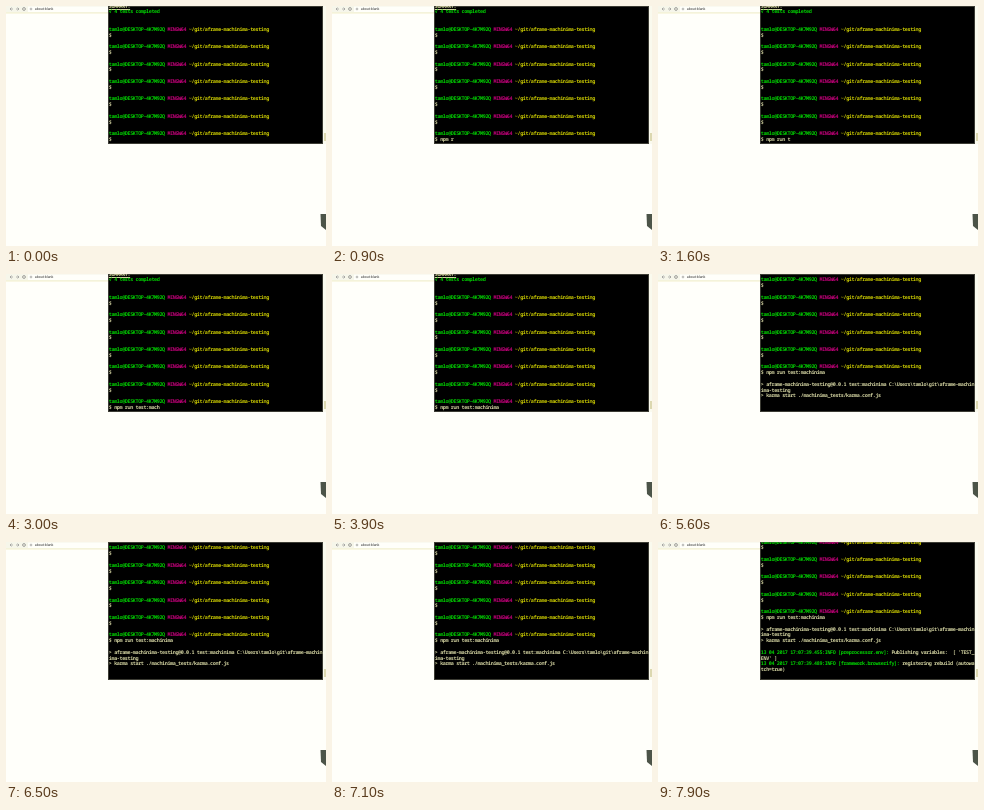
Animation, 320 px wide and 240 px high, one loop 8 s. Source, as an HTML page:

```html
<!DOCTYPE html>
<html lang="en">
<head>
<meta charset="utf-8">
<title>Terminal session</title>
<style>
  html, body { margin: 0; width: 100%; height: 100%; overflow: hidden; background: #fffffa; }
  body { position: relative; text-rendering: geometricPrecision; }
  #stage { position: absolute; inset: 0; width: 320px; height: 240px; }
  #url { font: 3.6px Roboto, sans-serif; fill: #333; }
  #terminal { position: absolute; left: 102px; top: 0; width: 215px; height: 138px; overflow: hidden; background: #000; box-shadow: inset 0 0 0 1px #3c3c34; }
  #rows { position: absolute; left: .8px; bottom: .3px; font: 600 5.1px "Noto Sans Mono", monospace; letter-spacing: calc(2.67px - .6em); color: #d2d2a0; }
  #rows div { height: 5.8px; line-height: 5.8px; white-space: pre; }
  #rows .green { color: #00d000; }
  #rows .magenta { color: #c00078; }
  #rows .yellow { color: #cccc00; }
  #rows .title { text-decoration: underline; }
</style>
</head>
<body>
<svg id="stage" viewBox="0 0 320 240">
  <path d="M0 0H102V7H0Z" fill="#f6f6ea"/>
  <path d="M22 .5H102V6H22Z" fill="#fffffa"/>
  <path d="M0 7H102" stroke="#f0ecc0" stroke-width=".8"/>
  <path d="M5.5 1.5 4 3l1.5 1.5M4 3h3M10 3h3M11.5 1.5 13 3l-1.5 1.5" fill="none" stroke="#888" stroke-width=".6"/>
  <circle cx="18" cy="3" r="1.4" fill="none" stroke="#666" stroke-width=".6"/>
  <circle cx="25" cy="3" r=".9" fill="none" stroke="#777" stroke-width=".5"/>
  <text id="url" x="28.7" y="4.3">about:blank</text>
  <path d="M317 0H320V138H317Z" fill="#fafaee"/>
  <path d="M318 127H320V135H318Z" fill="#dcd8b0"/>
  <path d="M314.5 208H320V224L315 220Z" fill="#4c5448"/>
</svg>
<div id="terminal"><div id="rows"></div></div>
<script>
const LOOP = 8000, KEY_MS = 175, ENTER = 4300, START = 5100, LOG = 7200, VISIBLE = 24;
const COMMAND = "npm run test:machinima";
const rowsBox = document.getElementById("rows");

const span = (style, text) => `<span class="${style}">${text}</span>`;
const prompt = span("green", "tamlo@DESKTOP-4K7M92Q") + " " + span("magenta", "MINGW64") +
  " " + span("yellow", "~/git/aframe-machinima-testing");
const info = (ms, unit) => span("green", `13 04 2017 17:07:39.${ms}:INFO [${unit}]: `);

const history = [span("title", "SUMMARY:"), span("green", "√ 4 tests completed"), "", ""];
for (let i = 0; i < 6; i++) history.push(prompt, "$", "");
history.push(prompt);

const script = [
  "",
  "&gt; aframe-machinima-testing@0.0.1 test:machinima C:\\Users\\tamlo\\git\\aframe-machin",
  "ima-testing",
  "&gt; karma start ./machinima_tests/karma.conf.js",
  ""
];
const log = [
  info(455, "preprocessor.env") + "Publishing variables:  [ 'TEST_",
  "ENV' ]",
  info(489, "framework.browserify") + "registering rebuild (autowa",
  "tch=true)"
];

let shown = "";
function draw(now) {
  const t = now % LOOP;
  const lines = [...history, "$ " + COMMAND.slice(0, Math.floor(t / KEY_MS))];
  if (t >= START) lines.push(...script);
  if (t >= LOG) lines.push(...log);
  if (t >= ENTER) lines.push("");
  const html = lines.slice(-VISIBLE).map(line => `<div>${line}</div>`).join("");
  if (html !== shown) rowsBox.innerHTML = shown = html;
  requestAnimationFrame(draw);
}
draw(performance.now());
</script>
</body>
</html>
```
